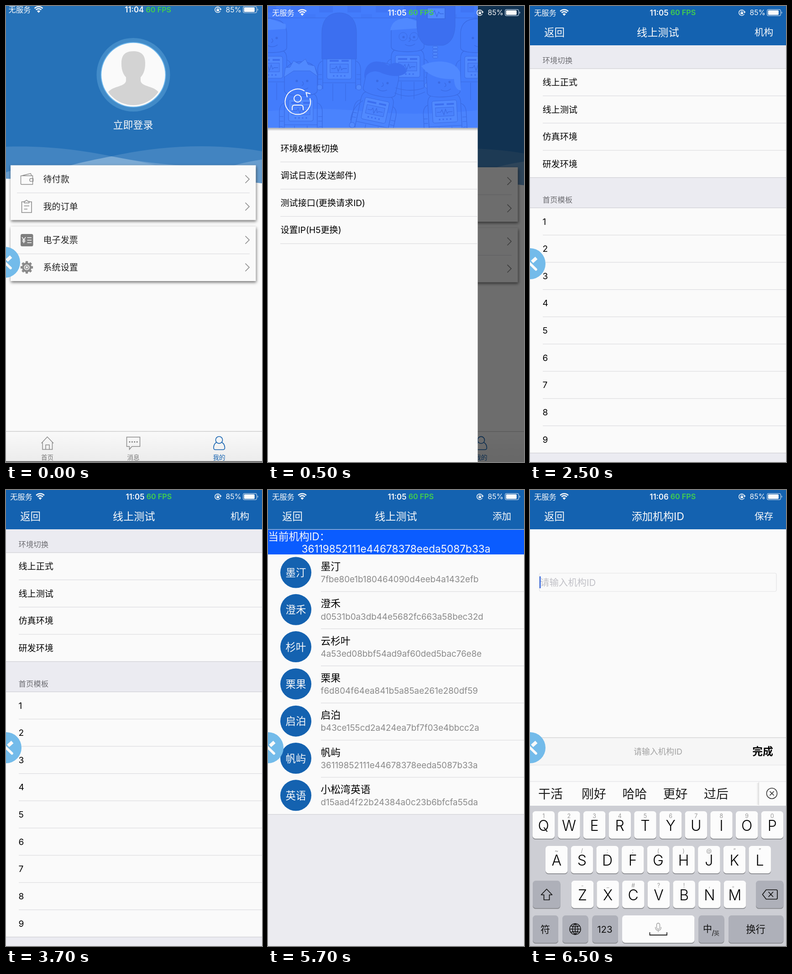
An HTML page for the animation above (8000 ms loop, 561 by 998 pixels).

```html
<!DOCTYPE html>
<html lang="zh-CN">
<head>
<meta charset="utf-8">
<title>App screens</title>
<style>
html, body { margin: 0; width: 100%; height: 100%; overflow: hidden; background: #fafafa; }
svg { display: block; width: 100vw; height: 100vh; }
text { font-family: Inter, "Noto Sans CJK SC", "Noto Sans CJK", sans-serif; white-space: pre; }
.card { filter: drop-shadow(1px 3px 3px rgba(0,0,0,.55)); }
</style>
</head>
<body>
<svg id="stage" viewBox="0 0 561 998" preserveAspectRatio="none" xmlns="http://www.w3.org/2000/svg"></svg>
<script>
const INK = '#fafafa', NAV = '#1462b0', GREY = '#8a8a8a';

// ---- drawing helpers ----
const rect = (x, y, w, h, fill, more = '') =>
  `<rect x="${x}" y="${y}" width="${w}" height="${h}" fill="${fill}" ${more}/>`;
const circle = (x, y, r, fill, more = '') =>
  `<circle cx="${x}" cy="${y}" r="${r}" fill="${fill}" ${more}/>`;
const path = (d, fill, more = '') => `<path d="${d}" fill="${fill}" ${more}/>`;
const stroke = (d, color, w = 1.5, more = '') =>
  path(d, 'none', `stroke="${color}" stroke-width="${w}" ${more}`);
const hline = (x1, x2, y, color = '#dcdcdf', w = 1.2) => rect(x1, y - w / 2, x2 - x1, w, color);
const group = (body, more) => `<g ${more}>${body}</g>`;
// y is the optical middle of the line of text
const text = (s, x, y, size, fill = '#000', more = '') =>
  `<text x="${x}" y="${(y + size * .37).toFixed(2)}" font-size="${size}" fill="${fill}" ${more}>${s}</text>`;
const mid = (s, x, y, size, fill, more = '') => text(s, x, y, size, fill, `text-anchor="middle" ${more}`);
const times = (n, fn) => Array.from({ length: n }, (_, i) => fn(i)).join('');
const round = 'stroke-linecap="round" stroke-linejoin="round"';

// ---- shared parts ----
function status(clock, y = 14.5, dx = 0) {
  const wave = r => stroke(`M${75 - r * .72} ${y + 6 - r * .72}A${r} ${r} 0 0 1 ${75 + r * .72} ${y + 6 - r * .72}`, INK, 2.7);
  return group(
      text('无服务', 9, y, 16.3, INK) + wave(12.2) + wave(8) +
      path(`M75 ${y + 7}l-3.6 -4a5 5 0 0 1 7.2 0z`, INK), `transform="translate(${dx})"`) +
    mid(clock, 283 + dx / 2, y, 16.8, INK, 'font-weight="600"') +
    mid('60 FPS', 335.5 + dx / 3, y, 16.2, '#42cf4c', 'font-weight="600"') +
    stroke(`M469.6 ${y + 3}A6.2 6.2 0 1 1 470.2 ${y - 1}`, INK, 1.5) +
    path(`M467.4 ${y - 2}h5.4l-2.7 3.6z`, INK) +
    rect(461.4, y - 1, 5.6, 4.4, INK, 'rx=".6"') +
    stroke(`M462.6 ${y - 1}v-1.2a1.6 1.6 0 0 1 3.2 0v1.2`, INK, 1.1) +
    text('85%', 481.5, y, 15.6, INK) +
    rect(519.6, y - 6.9, 29.8, 13.8, 'none', 'rx="3.4" stroke="#bcd0e6" stroke-width="1.2"') +
    rect(521.6, y - 4.9, 23.2, 9.8, INK, 'rx="1.6"') +
    path(`M551 ${y - 2.4}a2.6 2.6 0 0 1 0 4.8z`, '#bcd0e6');
}

const navBar = (title, action, clock) =>
  rect(0, 0, 561, 86, NAV) + status(clock) +
  text('返回', 31, 57.5, 22.5, INK) +
  mid(title, 280.3, 57.5, 23.1, INK) +
  mid(action, 512.5, 57.5, 20.6, INK);

const floatButton = (x, y) => group(
  circle(0, 0, 34, '#73bbea') +
  stroke('M-3 -3L13 12.5', INK, 5.6, 'stroke-linecap="round"') +
  stroke('M4.5 -4L14 -12.5', INK, 7.4), `transform="translate(${x} ${y})"`);

// ---- profile page ----
function gear(x, y) {
  return times(8, i => rect(-2.6, -13.6, 5.2, 6, GREY, `transform="translate(${x} ${y}) rotate(${i * 45})"`)) +
    circle(x, y, 8.3, INK, `stroke="${GREY}" stroke-width="4.4"`) +
    circle(x, y, 3.4, 'none', `stroke="${GREY}" stroke-width="2"`);
}

const menuRow = (label, y) =>
  text(label, 81.5, y, 19.1, '#222') + stroke(`M524.5 ${y - 8.5}L533 ${y}L524.5 ${y + 8.5}`, GREY, 1.6);

function profile() {
  const wave = 'rgba(255,255,255,.13)', crest = 'rgba(255,255,255,.2)';
  const avatar =
    circle(279, 150.5, 80.5, '#428bc8') + circle(279, 150.5, 71.6, '#6cb6ec') + circle(279, 150.5, 69.8, INK) +
    group(path('M253 127C252 106 263 99 279 99S306 106 305 127C305 140 301 150 295 156V164C298 178 326 174 336 191L330 222H228L222 191C232 174 260 178 263 164V156C257 150 253 140 253 127Z', '#d3d3d3'),
      'clip-path="url(#face)"');
  const icons =
    stroke('M33 371.5H58.5V390.5H34Q32.5 390.5 32.5 389V371M36 371L54 366.5L56 371M59.5 377.5H55a3.2 3.2 0 0 0 0 6.4H59.5Z', GREY, 1.4) +
    stroke('M40 428.5H34.5V452H56V428.5H50.5M40 431V427.5H42.5Q45 422.5 47.5 427.5H50.5V431ZM39.5 437.5H51M39.5 444.5H47', GREY, 1.6) +
    rect(32, 499, 27.5, 27, '#7f7f7f', 'rx="3.5"') +
    stroke('M35 506L39 511.5L43 506M39 511.5V519M35.5 512.5H42.5M35.5 515.5H42.5M46.5 507H56M46.5 512.5H56M46.5 518H56', INK, 1.6) +
    gear(45.5, 572);
  const tabs =
    rect(0, 931, 561, 80, 'url(#bar)') + hline(0, 561, 931, '#c4c4c4') +
    stroke('M77.5 957L90.5 943L104 957M80 955V970.5H101.5V955M87 970V960.5H95V970', GREY, 1.5) +
    stroke('M264.5 943.5H293.5V964H276L270.5 970.5V964H264.5Z', GREY, 1.5) +
    times(4, i => circle(271 + i * 5.4, 954, 1.5, '#777')) +
    circle(467, 949.8, 7.6, 'none', `stroke="${NAV}" stroke-width="1.6"`) +
    stroke('M461 955C456 958 455 963 455 967Q455 971 459 971H475Q479.5 971 479.5 967C479.5 963 478 958 473 955', NAV, 1.6) +
    mid('首页', 90.5, 988, 13.6, '#777') + mid('消息', 279, 988, 13.6, '#777') + mid('我的', 467, 988, 13.6, NAV);
  return rect(0, -10, 561, 1020, INK) +
    path('M0 -10H561V388Q480 379 280 379T0 378Z', '#2672b8') +
    path('M0 308C90 305 170 316 231 329C290 340 350 350 420 378H0Z', wave) +
    path('M140 349C165 342 200 335 231 329C320 309 440 297 561 318V388L480 380H140Z', wave) +
    path('M140 349C165 342 200 335 231 329C290 340 330 345 385 349Z', crest) +
    path('M490 352Q520 342 561 336V388L490 380Z', crest) +
    path('M0 364L12 360V380L0 378Z', crest) +
    avatar + mid('立即登录', 278.5, 260, 21.9, INK) +
    rect(10, 348.5, 537.5, 120, INK, 'class="card"') + rect(10, 482.5, 537.5, 119.5, INK, 'class="card"') +
    hline(24, 534, 409) + hline(24, 534, 542.5) +
    menuRow('待付款', 379) + menuRow('我的订单', 439) + menuRow('电子发票', 512) + menuRow('系统设置', 572) +
    icons + tabs;
}

// ---- drawer with tinted crowd picture ----
const LINE = '#3a6be4', DARK = '#3c6ff0', LIGHT = '#5089ff';
const DRAWER = 459.6, COVER = 266.5;

function figure(x, y, head, tilt = 0) {
  const panel =
    rect(-27, 0, 54, 48, LIGHT, `rx="4" stroke="${LINE}"`) +
    rect(-21, 6, 20, 4, DARK) + rect(5, 6, 16, 4, DARK) +
    rect(-20, 15, 40, 19, '#4a82fd', `stroke="${LINE}"`) +
    stroke('M-17 25H-9L-6 20L-2 31L2 19L5 28L8 25H17', LINE, 1.3) +
    times(4, i => circle(-12 + i * 8, 41, 1.8, DARK));
  const body =
    stroke('M-36 70V5Q-36 -14 -18 -14H18Q36 -14 36 5V70M-36 8Q-48 12 -47 32V62M36 8Q48 12 47 32V62', LINE, 1.3) +
    stroke('M-47 38H-38M-47 48H-38M38 38H47M38 48H47M-36 56H36M-14 58V96M14 58V96', LINE, 1.1) +
    circle(-43, 66, 6, LIGHT, `stroke="${LINE}"`) + circle(43, 66, 6, LIGHT, `stroke="${LINE}"`);
  return group(body + panel + head, `transform="translate(${x} ${y}) rotate(${tilt})"`);
}

function crowd() {
  const skull = stroke('M-36 -18V-52Q-34 -82 0 -82T36 -52V-18Q34 -8 0 -8T-36 -18Z', LINE, 1.3, 'style="fill:#437bfb"') +
    circle(-9, -40, 2.6, LINE) + circle(14, -40, 2.6, LINE) + stroke('M-6 -24Q5 -17 16 -25M3 -39Q9 -32 2 -30', LINE, 1.4);
  const glasses = circle(-10, -41, 9, 'none', `stroke="${LINE}"`) + circle(14, -41, 9, 'none', `stroke="${LINE}"`);
  const flat = path('M-38 -55Q-34 -82 0 -82L34 -70V-60Z', LIGHT);
  const tall = path('M-38 4V-52C-38 -84 -22 -97 0 -97S38 -84 38 -52V4Z', DARK, `stroke="${LINE}"`);
  const spikes = path('M-37 -48L-34 -69L-24 -70L-16 -84L-4 -77L10 -88L16 -76L30 -73L37 -50L20 -62L-16 -62Z', LIGHT, `stroke="${LINE}"`);
  const sweep = path('M-38 -40C-48 -76 -20 -90 8 -78C20 -94 44 -88 50 -74C44 -58 16 -54 -8 -60Q-30 -62 -38 -40Z', DARK);
  const quiff = path('M-46 -78C-26 -90 28 -92 38 -60V-20Q24 -22 24 -46Q-26 -46 -46 -78Z', LIGHT);
  return rect(0, 0, 460, 267, '#437cfc') +
    times(8, i => rect(i * 62 - 12, 0, 30, 14, DARK, 'opacity=".5"') + rect(i * 62 + 18, 18, 24, 8, DARK, 'opacity=".35"')) +
    hline(0, 460, 26, LINE, 1) +
    figure(5, 110, skull + flat) + figure(156, 112, skull + tall) +
    figure(306, 108, skull + flat + glasses) + figure(458, 110, skull) +
    path('M326 0V44Q330 84 350 86H384Q408 80 410 44V0Z', DARK, `stroke="${LINE}"`) +
    rect(349, 4, 39, 24, LIGHT, `stroke="${LINE}" stroke-width="2"`) + stroke('M353 17H361L365 10L370 23L374 13L377 17H385', LINE, 1.4) +
    times(4, i => rect(361, 88 + i * 7, 11, 5, LIGHT, `stroke="${LINE}" rx="2"`)) +
    path('M0 230Q110 220 220 231T460 228V267H0Z', LIGHT, 'opacity=".55"') +
    figure(72, 204, skull + spikes) +
    figure(240, 205, skull + sweep, 12) + figure(386, 207, skull + quiff, -3) +
    stroke('M277 190Q310 205 344 188M208 207Q184 222 181 250', LINE, 1.3) +
    stroke('M279 179Q314 190 342 179', LINE, 1.3);
}

function drawer() {
  const items = ['环境&amp;模板切换', '调试日志(发送邮件)', '测试接口(更换请求ID)', '设置IP(H5更换)'];
  return group(profile(), 'transform="scale(1 .99285) translate(0 7)"') +
    rect(0, 0, 561, 998, '#000', 'opacity=".56"') +
    rect(0, 0, DRAWER, 998, INK) +
    rect(0, COVER, DRAWER, 7, 'url(#shade)') +
    group(crowd(), 'clip-path="url(#cover)"') +
    stroke('M80 186A27.8 27.8 0 1 0 92 202', INK, 2) +
    stroke('M86 199.5L83.5 189.5L93 192', INK, 2) +
    circle(65, 202.5, 8, 'none', `stroke="${INK}" stroke-width="2"`) +
    stroke('M53 228V222Q53 217 58.5 217H71.5Q77 217 77 222V228', INK, 2) +
    items.map((s, i) => text(s, 27.5, 311.5 + i * 59.6, 19.1) + hline(27, DRAWER, 341.3 + i * 59.6)).join('') +
    status('11:05');
}

// ---- environment list ----
function section(label, labelY, top, rows) {
  const h = 59.63, bottom = top + rows.length * h;
  return text(label, 27.5, labelY, 16.4, '#6d6d72') + rect(0, top, 561, bottom - top, INK) +
    rows.map((s, i) => text(s, 27.5, top + h * (i + .5), 19.1) + (i ? hline(28, 561, top + h * i) : '')).join('') +
    hline(0, 561, top, '#cfcfd4') + hline(0, 561, bottom, '#cfcfd4');
}

const environments = () =>
  rect(0, 0, 561, 998, '#ebebf1') + navBar('线上测试', '机构', '11:05') +
  section('环境切换', 119, 137, ['线上正式', '线上测试', '仿真环境', '研发环境']) +
  section('首页模板', 424, 441.7, [...'123456789']) +
  floatButton(0, 564);

// ---- organisation list ----
const orgs = [
  ['墨汀', '7fbe80e1b180464090d4eeb4a1432efb'],
  ['澄禾', 'd0531b0a3db44e5682fc663a58bec32d'],
  ['云杉叶', '4a53ed08bbf54ad9af60ded5bac76e8e'],
  ['栗果', 'f6d804f64ea841b5a85ae261e280df59'],
  ['启泊', 'b43ce155cd2a424ea7bf7f03e4bbcc2a'],
  ['帆屿', '36119852111e44678378eeda5087b33a'],
  ['小松湾英语', 'd15aad4f22b24384a0c23b6bfcfa55da']
];

function organisations() {
  const h = 81.3;
  return rect(0, 0, 561, 998, '#ebebf0') + navBar('线上测试', '添加', '11:05') +
    rect(0, 86, 561, 55, '#0a5cff') + hline(0, 561, 86.4, '#b9c8da') +
    text('当前机构ID<tspan font-family="Noto Sans CJK TC, sans-serif">：</tspan>', .5, 101.5, 22.5, INK) +
    mid(orgs[5][1], 280.5, 128.5, 22.6, INK) +
    rect(0, 141, 561, 569, INK) +
    orgs.map(([name, id], i) => {
      const y = 141 + i * h;
      return circle(61, y + 39.5, 34, NAV) + mid(name.slice(-2), 61, y + 39.8, 22.4, INK) +
        text(name, 115.5, y + 26, 21.8) + text(id, 115.5, y + 54.3, 18.8, GREY) +
        (i < 6 ? hline(116, 561, y + h) : '');
    }).join('') +
    hline(0, 561, 710, '#cfcfd4') + floatButton(0, 564);
}

// ---- input page with keyboard ----
const key = (x, y, w, fill = '#fcfcfc') =>
  rect(x, y + 1.8, w, 60, '#898a8e', 'rx="6.5"') + rect(x, y, w, 60, fill, 'rx="6.5"');

const keyRow = (letters, hints, x, y) => [...letters].map((c, i) => {
  const left = x + i * 55.68;
  return key(left, y, 48.5) + mid(hints[i], left + 24.2, y + 10, 12.5, '#999') +
    mid(c, left + 24.2, y + 31.5, 32, '#000', 'font-weight="300"');
}).join('');

function keyboard() {
  const dim = '#aeb0b9';
  return rect(0, 638, 561, 53, '#fbfbfb') + hline(0, 561, 638, '#e3e3e6') +
    ['干活', '刚好', '哈哈', '更好', '过后'].map((s, i) => mid(s, 45 + [0, 95, 184.5, 273.5, 363][i], 665, 26.9, '#1c1c1c')).join('') +
    rect(496, 641, 5, 48, 'url(#edge)') + hline(501, 502, 664.5, '#ddd', 51) +
    circle(530, 664, 11.5, 'none', 'stroke="#333" stroke-width="1.6"') +
    stroke('M525.5 659.5L534.5 668.5M534.5 659.5L525.5 668.5', '#333', 1.7) +
    rect(0, 691, 561, 307, '#cdced4') +
    keyRow('QWERTYUIOP', '1234567890', 5.5, 703) +
    keyRow('ASDFGHJKL', '~/:;()@“”', 34, 779) +
    keyRow('ZXCVBNM', '-_#?!,。', 90.7, 855) +
    key(6, 855, 60.5, dim) + stroke('M36.5 873.5L48.5 886H42.5V897H30.5V886H24.5Z', '#111', 1.7, round) +
    key(495, 855, 60.5, dim) + stroke('M517.5 875H539.5Q542 875 542 877.5V893Q542 895.5 539.5 895.5H517.5L509.5 885.2ZM523 880L532.5 890M532.5 880L523 890', '#111', 1.7, round) +
    key(6, 931, 56, dim) + mid('符', 33.5, 961, 21, '#111') +
    key(71, 931, 56.5, dim) + circle(99, 961, 12, 'none', 'stroke="#111" stroke-width="1.6"') +
    stroke('M87 961H111M99 949V973M99 949C91 955 91 967 99 973C107 967 107 955 99 949M89.5 954Q99 958 108.5 954M89.5 968Q99 964 108.5 968', '#111', 1.5) +
    key(136.5, 931, 56.5, dim) + mid('123', 164, 961, 20.5, '#111') +
    key(202, 931, 158.5) +
    rect(277.5, 948, 7, 13, 'none', 'rx="3.5" stroke="#999" stroke-width="1.3"') +
    stroke('M274.5 956.5Q275 964 281 964T287.5 956.5M281 964V967.5', '#999', 1.3) +
    stroke('M262.5 968V974H300V968', '#222', 1.8) +
    key(369.5, 931, 56, dim) + text('中', 379, 961, 20, '#111') + text('/', 398.5, 968, 15, '#111') + text('英', 403, 970.5, 12, '#333') +
    key(435, 931, 120.5, dim) + mid('换行', 494.5, 961, 21.3, '#111');
}

const addForm = () =>
  rect(0, 0, 561, 998, INK) + navBar('添加机构ID', '保存', '11:06') +
  rect(20.5, 182, 519.5, 40, INK, 'rx="3.5" stroke="#e3e3e5" stroke-width="1.2"') +
  text('请输入机构ID', 22, 202, 20.4, '#c1c1c7') + rect(20.8, 189, 2.6, 26, '#3566dc') +
  rect(0, 542, 561, 60, '#f6f6f6') + hline(0, 561, 542, '#cdcdcf') + hline(0, 561, 602, '#e6e6e8') +
  mid('请输入机构ID', 280.5, 572, 17.8, '#a2a2a2') +
  mid('完成', 510, 572, 22.8, '#000', 'font-weight="600"') +
  keyboard() + floatButton(0, 564);

// ---- stage ----
const gradient = (id, dir, a, b) =>
  `<linearGradient id="${id}" x1="0" y1="0" ${dir}><stop offset="0" ${a}/><stop offset="1" ${b}/></linearGradient>`;
const defs = `<defs>
  <clipPath id="face"><circle cx="279" cy="150.5" r="66.5"/></clipPath>
  <clipPath id="cover"><rect width="${DRAWER}" height="${COVER}"/></clipPath>
  ${gradient('bar', 'x2="0" y2="1"', 'stop-color="#f9f9f9"', 'stop-color="#e9e9e9"')}
  ${gradient('shade', 'x2="0" y2="1"', 'stop-color="#000" stop-opacity=".32"', 'stop-color="#000" stop-opacity="0"')}
  ${gradient('edge', 'x2="1" y2="0"', 'stop-color="#000" stop-opacity="0"', 'stop-color="#000" stop-opacity=".1"')}
</defs>`;

const home = () => profile() + status('11:04', 8, -3.5) +
  rect(0, 996, 561, 2, '#6a6a6a') + floatButton(-3, 561);

const screens = [
  { from: 0, draw: home },
  { from: 500, draw: drawer },
  { from: 2500, draw: environments },
  { from: 4500, draw: organisations },
  { from: 6500, draw: addForm }
];
const LOOP = 8000;
const stage = document.getElementById('stage');
stage.innerHTML = defs + screens.map(s => group(s.draw(), 'class="screen" visibility="hidden"')).join('');
const layers = [...stage.querySelectorAll('.screen')];

function render(ms) {
  const t = ms % LOOP;
  const current = screens.filter(s => s.from <= t).length - 1;
  layers.forEach((g, i) => g.setAttribute('visibility', i === current ? 'visible' : 'hidden'));
}

let start;
function tick(now) {
  start ??= now;
  render(Math.max(0, now - start));
  requestAnimationFrame(tick);
}
render(0);
requestAnimationFrame(tick);
</script>
</body>
</html>
```
